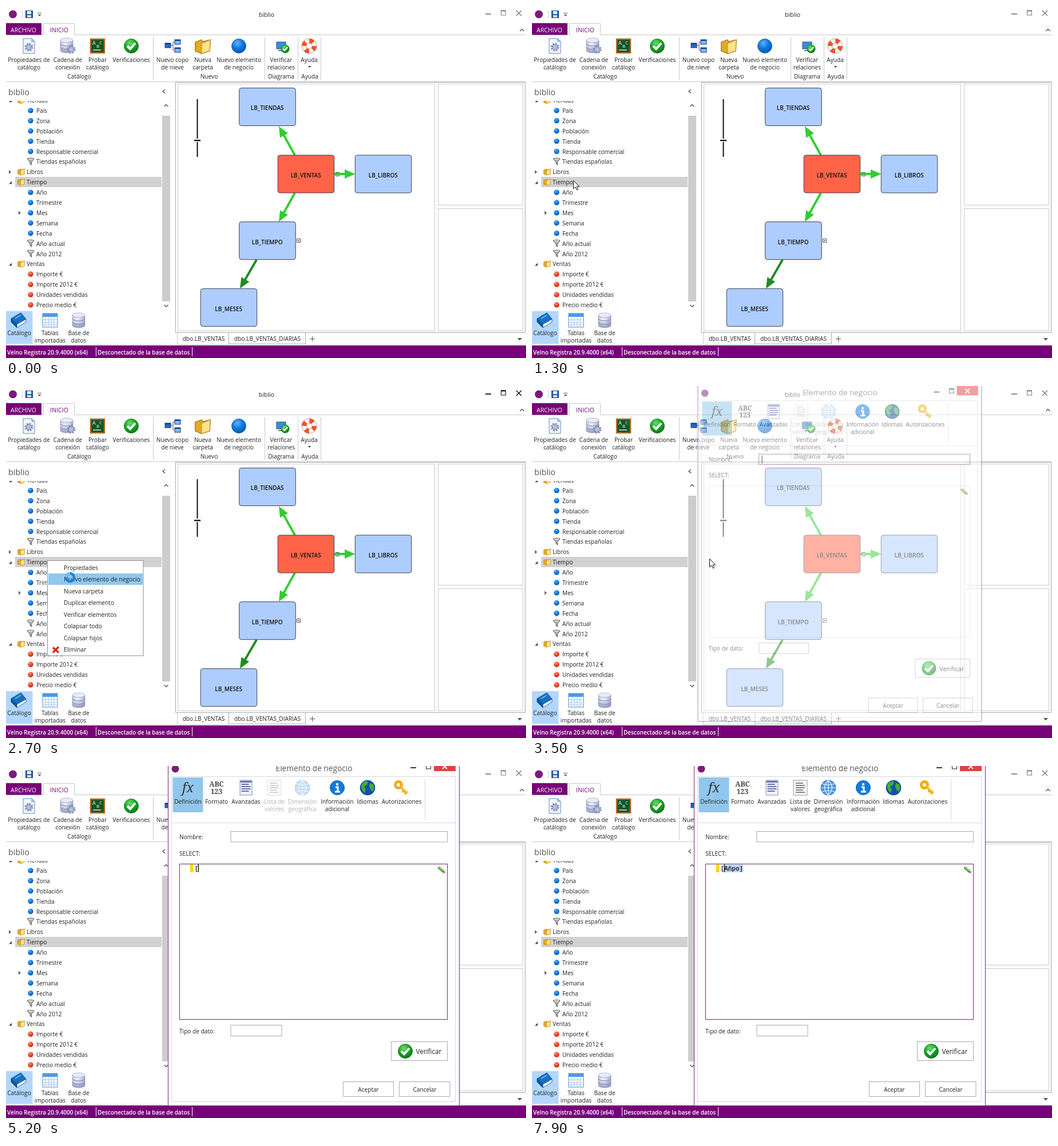
Recreate the animation shown at these times as an HTML page. Size 909x616 px, loop 8 s.

```html
<!DOCTYPE html>
<html lang="es">
<head>
<meta charset="utf-8">
<style>
html, body { margin: 0; width: 100%; height: 100%; overflow: hidden; background: #fff; }
svg { display: block; width: 909px; height: 616px; font: 10.15px "Open Sans", "Noto Sans", sans-serif; fill: #222; }
text { white-space: pre; }
</style>
</head>
<body>
<svg id="stage" viewBox="0 0 909 616" xmlns="http://www.w3.org/2000/svg"></svg>
<script>
const PURPLE = '#780078', GRAY = '#c9c9c9';

// Drawing helpers: each returns SVG markup.
const text = (x, y, s, extra = '') => `<text x="${x}" y="${y}" ${extra}>${s}</text>`;
const mid = (x, y, s, extra = '') => text(x, y, s, 'text-anchor="middle" ' + extra);
const rect = (x, y, w, h, fill, stroke = 'none', extra = '') =>
  `<rect x="${x}" y="${y}" width="${w}" height="${h}" fill="${fill}" stroke="${stroke}" ${extra}/>`;
const path = (d, fill = 'none', stroke = 'none', width = 1, extra = '') =>
  `<path d="${d}" fill="${fill}" stroke="${stroke}" stroke-width="${width}" ${extra}/>`;
const line = (d, stroke = GRAY, width = 1) => path(d, 'none', stroke, width);
const disc = (x, y, r, fill, extra = '') => `<circle cx="${x}" cy="${y}" r="${r}" fill="${fill}" ${extra}/>`;
const at = (x, y, body, scale = 1) => `<g transform="translate(${x} ${y}) scale(${scale})">${body}</g>`;
const group = (id, body, extra = '') => `<g id="${id}" ${extra}>${body}</g>`;
const caption = (x, y, ...rows) => rows.map((s, i) => mid(x, y + 13 * i, s)).join('');
const ball = (id, light, base, dark) => `<radialGradient id="${id}" cx=".4" cy=".3" r=".75">
  <stop offset="0" stop-color="${light}"/><stop offset=".5" stop-color="${base}"/><stop offset="1" stop-color="${dark}"/></radialGradient>`;

const defs = `<defs>${ball('blue', '#5fb4ff', '#0c78e0', '#0855b0')}${ball('red', '#ff9a80', '#f04420', '#b82a10')}
  ${ball('green', '#6be066', '#18a828', '#0a7414')}${ball('steel', '#f2f4fc', '#c3c9e2', '#8f98bd')}
  <clipPath id="treeClip"><path d="M0 166H272V532H0z"/></clipPath></defs>`;

// Icons, centred on the origin.
const folder = path('M-6-3L-1-5L0-3.5L6-5L5.5 4L-1 6L-6 4z', '#e3aa22', '#a87a10', .6) +
  path('M-1-2L6-5L5.5 4L-1 6z', '#ffe38a', '#b88a1c', .5);
const funnel = path('M-6-5Q0-7 6-5L1.5 1V6L-1 4V1z', '#b5b5b5', '#444', .9) + line('M-4-4.5H4', '#fff', 1.2);
const gear = disc(0, 0, 6, 'none', 'stroke="#7d8cb4" stroke-width="3" stroke-dasharray="2.6 2.1"') +
  disc(0, 0, 4.3, '#e6eaf6', 'stroke="#8796bd" stroke-width="2"') + disc(0, 0, 1.8, '#fff', 'stroke="#66759c"');
const cylinder = path('M-11-9V9A11 4 0 0 0 11 9V-9z', 'url(#steel)', '#8a90b5', .6) +
  line('M-11-3A11 4 0 0 0 11-3M-11 3A11 4 0 0 0 11 3', '#7c83ac') +
  '<ellipse cy="-9" rx="11" ry="4" fill="#e9ebf8" stroke="#9ba1c4" stroke-width=".7"/>';
const check = disc(0, 0, 12.5, 'url(#green)', 'stroke="#0d6d18" stroke-width=".8"') + line('M-7 0L-2 5L7-5', '#fff', 4);
const page = path('M-10-13H5L10-8V13H-10z', '#f3f7ff', '#5f86c8') + path('M5-13V-8H10z', '#c6d5f0', '#5f86c8');
const board = rect(-12, -12, 24, 24, '#12562a', '#b2691e', 'stroke-width="2.4"') +
  text(-9, -2, 'A', 'font-size="9" fill="#fff"') + text(-2, 3, 'B', 'font-size="8" fill="#fff"') + text(3, -3, 'C', 'font-size="8" fill="#ffe680"') +
  line('M-8 7H6', '#d8e8d8', 1.5);
const flake = line('M-4-1H1V-7H4M1-1V7H4', '#555') + rect(-13, -5, 10, 8, '#2467c8', '#123c80') +
  rect(4, -11, 10, 8, '#7cbcf5', '#123c80') + rect(4, 3, 10, 8, '#7cbcf5', '#123c80') + line('M-13-4H-3M4-10H14M4 4H14', '#123c80', 2);
const relations = rect(-10, -7, 16, 12, '#3c8ae0', '#2a4f86') + line('M-7 8H3', '#777', 2) + at(5, 5, check, .58);
const buoy = disc(0, 0, 9, 'none', 'stroke="#f4f4f4" stroke-width="8"') +
  disc(0, 0, 9, 'none', 'stroke="#ee5427" stroke-width="8" stroke-dasharray="7.07"') +
  disc(0, 0, 12.9, 'none', 'stroke="#b9684e" stroke-width=".6"') + disc(0, 0, 5, '#fff', 'stroke="#b9684e" stroke-width=".6"');
const book = path('M-13-3L4-13L13-2L-3 7z', '#1671c4', '#0b4a8c') + path('M-13-3V3L-3 13V7z', '#0d559e', '#0b4a8c') +
  path('M-3 7L13-2V3L-3 13z', '#f2f6fb', '#0b4a8c', .8) + line('M-6-3L4-9', '#6fb8f0', 2);
const table = rect(-13, -12, 26, 24, '#fff', '#4b8fd0') + rect(-13, -12, 26, 6, '#4b9be6') +
  line('M-13-1H13M-13 4H13M-13 8H13M-8-6V12M-3-6V12M2-6V12M7-6V12', '#9cc4ea');
const lines = (n, color) => Array.from({length: n}, (_, i) => line(`M-8 ${-8 + i * 4}H${i % 3 ? 8 : 5}`, color, 1.8)).join('');
const advanced = rect(-10.5, -13, 21, 26, '#eef0fa', '#8a91b4') + rect(-10, -12, 20, 3, '#6c76a8') + at(0, 2, lines(4, '#5866a5'));
const list = rect(-12, -13, 24, 26, '#fafafa', '#999') + at(0, 0, lines(5, '#777'));
const globe = disc(0, 0, 13, '#4f96e2', 'stroke="#2867b4"') +
  line('M-13 0H13M0-13V13M-11-7Q0-3 11-7M-11 7Q0 3 11 7M0-13Q-13 0 0 13M0-13Q13 0 0 13', '#e8f3ff', 1.2);
const info = disc(0, 0, 12.5, '#147bd8', 'stroke="#0d5cab"') + disc(0, -6, 2.2, '#fff') + line('M-3-1H1V7M-4 7H5', '#fff', 3);
const earth = disc(0, 0, 13, '#1550a8', 'stroke="#0b3274" stroke-width=".6"') +
  path('M-11-5Q-6-13 1-11L-1-5L-6-2L-3 3L-5 9Q-12 4-11-5zM4-8L10-6Q13 1 9 7L5 3L3-2z', '#3fae3a');
const key = disc(-5, -5, 5.5, 'none', 'stroke="#f0ad14" stroke-width="5"') + line('M-1-1L11 9M5 4L2 8M9 8L6 11', '#f0ad14', 4) + line('M0-1L11 8', '#ffe07a', 1.2);
const cross = line('M-5-4L5 5M5-5L-5 5', '#d92a14', 3.5);
const chevron = (x, y, d) => line(`M${x} ${y}${d}`, '#555', 1.4);
const controls = (x, y) => line(`M${x} ${y}h10`, 'currentColor', 1.8) +
  rect(x + 27.5, y - 6, 8, 8, 'none', 'currentColor') + line(`M${x + 27} ${y - 5.5}h9`, 'currentColor', 2);

function titleAndRibbon() {
  const icons = [[40, page + at(0, 2, gear)], [108, at(-2, -1, cylinder) + at(6, 6, gear)], [160, board], [219, check], [291, flake],
    [344, at(0, 0, folder, 2.2)], [407, disc(0, 0, 12.5, 'url(#blue)', 'stroke="#0b4c9c" stroke-width=".7"')], [483, relations], [530, buoy]];
  const captions = [[40, 'Propiedades de', 'catálogo'], [108, 'Cadena de', 'conexión'], [160, 'Probar', 'catálogo'], [219, 'Verificaciones'],
    [291, 'Nuevo copo', 'de nieve'], [344, 'Nueva', 'carpeta'], [407, 'Nuevo elemento', 'de negocio'], [481, 'Verificar', 'relaciones'], [530, 'Ayuda']];
  return disc(12, 14.5, 7, '#7a1c7c') + line('M28.5 8V21') +
    rect(34.5, 8.5, 12, 12, '#1d63b8', '#123e80') + rect(37, 9, 7, 5, '#fff') + rect(37, 16, 7, 4, '#cfe0f5') +
    line('M55 12.5H62', '#555') + path('M55.5 15H61.5L58.5 18z', '#555') + mid(455.5, 19, 'biblio', 'font-size="10.4"') +
    group('controls', controls(838, 14) + line('M892 8L901 17M901 8L892 17', 'currentColor', 1.5)) +
    line('M0 50.5H65.5V30.5H119.5V50.5H909M0 132.5H909') + rect(0, 30, 62, 20.5, PURPLE) +
    mid(30.5, 45.5, 'ARCHIVO', 'font-size="10.5" fill="#fff"') + mid(93, 45.5, 'INICIO', `font-size="10.6" fill="${PURPLE}"`) +
    chevron(898.5, 44, 'l3.5-3.5l3.5 3.5') + line('M257.5 54V129M452.5 54V129M510.5 54V129M550.5 54V129') +
    icons.map(([x, icon]) => at(x, 70, icon)).join('') + captions.map(([x, ...rows]) => caption(x, 97.5, ...rows)).join('') +
    path('M528 105H533L530.5 108z', '#333') +
    [[128, 'Catálogo'], [355, 'Nuevo'], [481, 'Diagrama'], [531, 'Ayuda']].map(([x, s]) => mid(x, 127, s)).join('');
}

const rowY = i => 165.2 + 17.9 * i;
function tree() {
  // Prefixes: + open folder, > closed folder, b blue ball, e expandable ball, f filter, r red ball
  const rows = ('+Tiendas|bPaís|bZona|bPoblación|bTienda|bResponsable comercial|fTiendas españolas|>Libros|+Tiempo|bAño|bTrimestre|' +
    'eMes|bSemana|bFecha|fAño actual|fAño 2012|+Ventas|rImporte €|rImporte 2012 €|rUnidades vendidas|rPrecio medio €').split('|');
  const closed = (x, y) => path(`M${x - 2} ${y - 3.5}L${x + 2} ${y}L${x - 2} ${y + 3.5}z`, '#666');
  const body = rows.map((row, i) => {
    const y = rowY(i), kind = row[0], top = '+>'.includes(kind);
    const icon = top ? at(26.5, y - .5, folder) : kind === 'f' ? at(43, y - .5, funnel)
      : disc(43, y - .2, 4.7, kind === 'r' ? 'url(#red)' : 'url(#blue)');
    const arrow = kind === '+' ? path(`M10 ${y - 2}V${y + 3}H5z`, '#444') : kind === '>' ? closed(7, y) : kind === 'e' ? closed(24, y) : '';
    return arrow + icon + text(top ? 36 : 53, Math.round(y + 3.8), row.slice(1));
  }).join('');
  return text(4, 155.5, 'biblio', 'font-size="14.3" fill="#555"') + chevron(278, 146, 'l-4 3.2l4 3.2') +
    `<g clip-path="url(#treeClip)">${rect(16, 299, 256, 18, '#d1d1d1')}${rect(33, 0, 239, 17.5, '#cfe9f8', 'none', 'id="hover"')}${body}</g>` +
    rect(273, 192, 14, 325, '#cdcdcd') + chevron(276.5, 176, 'l3.5-3.5l3.5 3.5') + chevron(276.5, 523, 'l3.5 3.5l3.5-3.5') +
    rect(0, 534, 46.5, 57, '#b2d6ff') + at(22, 550, book) + at(77, 550, table) + at(127, 550, cylinder) +
    caption(23, 576, 'Catálogo') + caption(77, 576, 'Tablas', 'importadas') + caption(127, 576, 'Base de', 'datos');
}

function diagram() {
  const node = (x, y, name, fill = '#aecdff') => rect(x, y, 98.5, 66, fill, '#3a3f4a', 'rx="4"') +
    mid(x + 49, y + 38.8, name, 'font-size="10" font-weight="600" fill="#111"');
  const arrow = (x, y, x2, y2, color = '#32cd32') => {
    const len = Math.hypot(x2 - x, y2 - y), angle = Math.atan2(y2 - y, x2 - x) * 180 / Math.PI;
    return `<g transform="translate(${x} ${y}) rotate(${angle})">${line(`M0 0H${len - 15}`, color, 4)}${path(`M${len} 0l-18.5-8v16z`, color)}</g>`;
  };
  const toggle = (x, y) => rect(x, y, 6, 6, '#fff', '#555') + line(`M${x + 1.5} ${y + 3}h3`, '#222');
  return line('M296.5 133V571.5H907.5V133.5H296.5', '#aaa') + rect(300.5, 136.5, 449, 432, '#fff', GRAY) +
    rect(755.5, 136.5, 148, 212, '#fff', GRAY) + rect(755.5, 354.5, 148, 214, '#fff', GRAY) +
    line('M334.5 163V232M334.5 238V264', '#111', 2) + line('M329 235.3H340', '#111', 2.4) +
    toggle(576.5, 291.5) + toggle(508.5, 407.5) +
    arrow(505, 261, 477, 210.5) + arrow(574, 294, 610.5, 294) + arrow(505, 327, 477, 377.5) + arrow(438, 444, 409, 494.5, '#228b22') +
    node(407.7, 143.5, 'LB_TIENDAS') + node(475.2, 261, 'LB_VENTAS', '#ff6449') + node(610.3, 261, 'LB_LIBROS') +
    node(407.7, 377.7, 'LB_TIEMPO') + node(340.2, 494.7, 'LB_MESES') +
    line('M299.5 572V592.5H389.5') + rect(389.5, 571.5, 134, 20, '#fff', '#aaa') +
    mid(345.5, 586, 'dbo.LB_VENTAS') + mid(457, 586, 'dbo.LB_VENTAS_DIARIAS') + line('M531 582.5H540M535.5 578V587', '#555') +
    path('M894 581H902L898 585.5z', '#555');
}

const statusBar = () => rect(0, 594, 909, 22, PURPLE) + line('M157.5 597V613M325.5 597V613', '#fff') +
  `<g fill="#fff" font-size="9.9" font-weight="600">${text(2, 609.5, 'Velno Registra 20.9.4000 (x64)')}${text(160, 609.5, 'Desconectado de la base de datos')}</g>`;

function contextMenu() {
  const items = ['Propiedades', 'Nuevo elemento de negocio', 'Nueva carpeta', 'Duplicar elemento', 'Verificar elementos', 'Colapsar todo', 'Colapsar hijos', 'Eliminar'];
  return rect(72.5, 305.5, 167.5, 166.5, '#fff', '#8c8c8c') + rect(74, 0, 165, 20, '#91c7ee', 'none', 'id="menuHover"') +
    items.map((s, i) => text(101, 321.5 + 20.55 * i, s, 'font-size="10.25"')).join('') + at(87, 461.5, cross);
}

function dialog() {
  const optional = (x, icon, ...rows) => `<g class="optional">${at(x, 38, icon)}${caption(x, 65.5, ...rows)}</g>`;
  const button = (x, y, w, h) => rect(x, y, w, h, '#fff', '#aaa');
  return rect(283.5, -54.5, 509, 649, '#fff', '#8a3f8c', 'stroke-width="1.2"') + line('M289.5 18.5H785.5V587.5H289.5zM289.5 99.5H785.5M732.5 23V95', '#d8d8d8') +
    disc(296, 5, 6.5, '#7a1c7c') + mid(538.5, 9, 'Elemento de negocio', 'font-size="13.7" fill="#555"') +
    `<g color="#222">${controls(707, 3)}</g>` + rect(748, -8, 38, 17, '#e04343') + line('M763-3L771 5M771-3L763 5', '#fff', 1.8) +
    rect(291.5, 20, 53, 61, '#91c7ec') + mid(318, 46, 'fx', 'font-family="Noto Serif, Liberation Serif, serif" font-size="23" font-style="italic" font-weight="500" fill="#333"') +
    '<g font-family="Noto Serif, Liberation Serif, serif" font-weight="700" font-size="12.2" fill="#444">' + mid(368, 36, 'ABC') + mid(368, 49, '123') + '</g>' +
    at(419.5, 38, advanced) + at(579, 38, info) + at(632, 38, earth) + at(691, 38, key) +
    caption(318, 65.5, 'Definición') + caption(368, 65.5, 'Formato') + caption(419.5, 65.5, 'Avanzadas') +
    optional(469, list, 'Lista de', 'valores') + optional(518, globe, 'Dimensión', 'geográfica') +
    caption(579, 65.5, 'Información', 'adicional') + caption(632, 65.5, 'Idiomas') + caption(691.5, 65.5, 'Autorizaciones') +
    text(303, 128, 'Nombre:') + text(303, 156.5, 'SELECT:') + text(303, 467.5, 'Tipo de dato:') +
    rect(393, 114.5, 378.5, 18.5, '#fff', '#aaa', 'id="nameBox"') + rect(303.5, 171.5, 468, 272, '#fff', '#ccc', 'id="editor"') +
    rect(393, 453.5, 89, 19, '#fff', '#aaa') + line('M756 177L765 185', '#4f9d38', 5) + line('M757 176.5L765 184', '#a5dc86', 2) + line('M764 184.2L767 187', '#c85a4a', 3) +
    button(673.5, 482.5, 98, 33) + at(698, 499, check) + text(716.5, 504, 'Verificar', 'font-size="11.7"') +
    button(589.5, 552.5, 88, 26) + button(687.5, 552.5, 88.5, 26) + mid(633.5, 570, 'Aceptar') + mid(732, 570, 'Cancelar') +
    rect(322, 172.5, 5.5, 13.5, '#ffd400', 'none', 'id="changeBar"') + rect(0, 172.5, 0, 13.5, '#b5d6f5', 'none', 'id="selection"') +
    text(329.5, 183, '', 'id="code" font-family="DejaVu Sans Mono, monospace" font-size="11" fill="#111" stroke="#111" stroke-width=".25"') +
    rect(0, 172, 1.3, 14, '#000', 'none', 'id="caret"');
}

const pointer = path('M.5.5V15L4 11.8L6.3 17L8.5 16L6.2 11H10.8z', '#fff', '#111');
const spinner = disc(0, 0, 7, 'none', 'stroke="#1f83d8" stroke-width="4.5"') + line('M-7 0A7 7 0 0 1 0-7', '#7cc4f8', 3.5);

stage.innerHTML = defs + titleAndRibbon() + tree() + diagram() + statusBar() + group('menu', contextMenu()) +
  group('dialogBox', dialog()) + group('arrow', pointer) + group('busy', spinner);

const el = id => document.getElementById(id);
const set = (id, attrs) => { for (const k in attrs) el(id).setAttribute(k, attrs[k]); };
const show = (id, on) => set(id, {visibility: on ? 'visible' : 'hidden'});
const clamp = v => Math.min(1, Math.max(0, v));

const pointerPath = [[300, 40, 40], [700, 77, 320], [800, 77, 320], [1000, 74, 314], [1100, 74, 314], [1300, 72, 305],
  [1900, 72, 305], [2000, 76, 305], [2400, 112, 335], [3200, 112, 335], [3500, 310, 302], [8000, 310, 302]];
const typing = [[5200, 1], [5700, 2], [5900, 3], [6100, 4], [6200, 5], [6900, 6]];
const within = (t, a, b) => t >= a && t < b;

function pointerAt(t) {
  const i = Math.max(1, pointerPath.findIndex(p => p[0] >= t));
  const [t0, x0, y0] = pointerPath[i - 1], [t1, x1, y1] = pointerPath[i], k = clamp((t - t0) / (t1 - t0));
  return [x0 + (x1 - x0) * k, y0 + (y1 - y0) * k];
}

function render(t) {
  const [x, y] = pointerAt(t), move = {transform: `translate(${x} ${y})`};
  const busy = within(t, 2700, 2800);
  set('arrow', move);
  set('busy', move);
  show('arrow', within(t, 300, 4100) && !busy);
  show('busy', busy);
  set('controls', {color: within(t, 1600, 3300) ? '#111' : '#808080'});

  const row = Math.round((y - rowY(0)) / 17.9);
  show('hover', within(t, 300, 1600) && y > 170 && row !== 8);
  set('hover', {y: rowY(row) - 8.8});

  show('menu', within(t, 1600, 2800));
  set('menu', {opacity: clamp((t - 1500) / 300)});
  const item = Math.floor((y - 307.5) / 20.55);
  set('menuHover', {y: 307.5 + 20.55 * item, opacity: +(t >= 2000 && item >= 0)});

  const open = clamp((t - 3250) / 500), scale = .949 + .051 * open;
  set('dialogBox', {opacity: open, transform: `translate(537.5 300) scale(${scale}) translate(-537.5 -300)`});

  const inEditor = t >= 4100;
  set('nameBox', {stroke: inEditor ? '#aaa' : '#8a2f8c'});
  set('editor', {stroke: inEditor ? '#6a306c' : '#ddd'});
  document.querySelectorAll('.optional').forEach(g => g.setAttribute('opacity', t >= 5900 ? 1 : .35));

  const typed = typing.reduce((n, [start, count]) => t >= start ? count : n, 0);
  const caret = t >= 7900 ? 1 : t >= 7500 ? 5 : typed;
  const column = n => 329.5 + 6.62 * n;
  el('code').textContent = '[Añpo]'.slice(0, typed);
  set('changeBar', {opacity: +(typed > 0)});
  set('selection', {x: column(caret), width: column(typed) - column(caret)});
  const blinkOff = within(t, 4600, 5100) || within(t, 6600, 6900) || within(t, 7400, 7500);
  set('caret', inEditor ? {x: column(caret) - .6, y: 172, opacity: +!blinkOff} : {x: 398, y: 117, opacity: 1});
}

const start = performance.now();
function frame() {
  const t = (performance.now() - start) % 8000;
  render(Math.floor(t / 100) * 100);
  requestAnimationFrame(frame);
}
frame();
</script>
</body>
</html>
```
